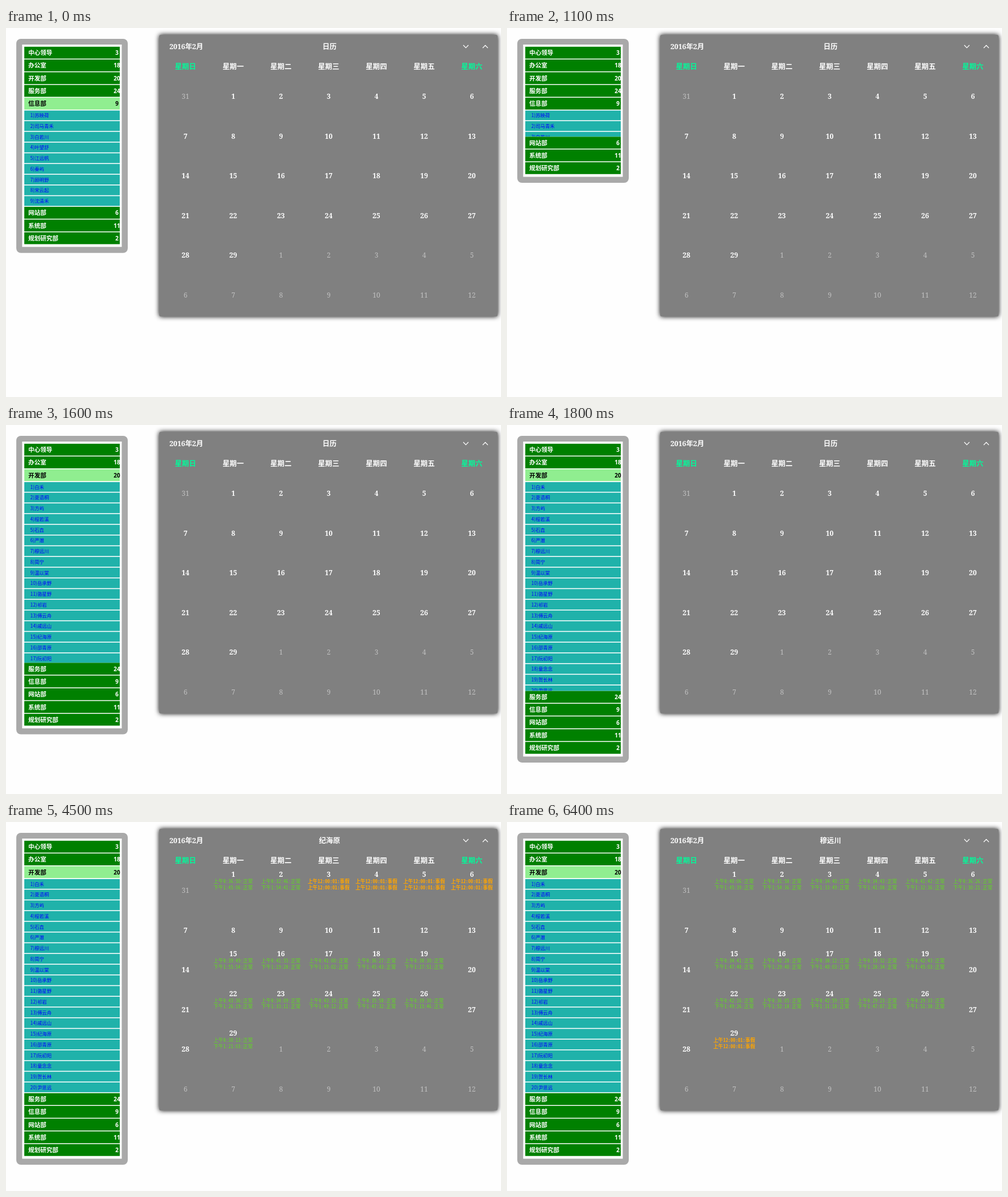
Animation of 866x646 px, one loop 8000 ms. Source, as an HTML page:

```html
<!DOCTYPE html>
<html lang="zh-CN">
<head>
<meta charset="utf-8">
<style>
html, body { margin: 0; width: 100%; height: 100%; overflow: hidden; background: #fefefe; }
body > svg { display: block; }
text { white-space: pre; }
.mid { text-anchor: middle; }
.dept { font: bold 10.5px 'Noto Sans CJK SC', sans-serif; }
.count { font: bold 10px 'Open Sans', 'Noto Sans', sans-serif; }
.item { font: 8.4px 'Noto Sans CJK SC', sans-serif; fill: #00f; }
.cal { font: bold 12.3px 'Noto Serif', 'Noto Sans CJK SC', serif; fill: #fff; }
.day { font: 600 12px 'Noto Serif', serif; fill: #fff; }
.other { font-weight: 400; fill: #bfbfbf; }
.weekend { fill: #00fa9a; }
.log { font: 8.6px 'Noto Sans Mono CJK SC', 'Noto Sans CJK SC', monospace; fill: #5fdc1e; }
.leave { font-weight: bold; fill: #ffa500; }
.board { fill: #808080; filter: drop-shadow(0 0 4px #000); }
</style>
</head>
<body>
<svg id="stage" width="866" height="646"></svg>
<script>
const LOOP = 8000, ROW = 22.3, ITEM = 18.75;
const DEV = 2, INFO = 4;
const depts = ['中心领导 3', '办公室 18', '开发部 20', '服务部 24',
  '信息部 9', '网站部 6', '系统部 11', '规划研究部 2'].map(s => s.split(' '));
const people = {
  [INFO]: '苏映荷 司马青禾 白若川 叶望舒 江远帆 秦屿 顾明野 宋云起 沈清禾'.split(' '),
  [DEV]: ('白禾 夏语桐 方屿 程若溪 石垚 严澈 穆远川 简宁 温以棠 岳承野 骆星野 祁岩 ' +
    '傅云舟 戚远山 纪海原 邵青原 阮初阳 童念念 贺长林 尹思远').split(' ')
};

// Whose attendance is on the calendar: clock seed, days on leave, extra Saturday shift
const sheets = {
  first: { seed: 1, leave: d => d > 2 && d < 7, saturday: true },
  second: { seed: 2, leave: () => false, saturday: false },
  third: { seed: 3, leave: d => d === 29, saturday: true }
};

const random = n => {
  const v = Math.sin(n * 12.9898) * 43758.5453;
  return v - Math.floor(v);
};
const swing = p => .5 - Math.cos(Math.PI * p) / 2;

const text = (s, x, y, cls, size, fill = '') =>
  `<text x="${x}" y="${y + size * .37}" class="${cls}"${fill && ` fill="${fill}"`}>${s}</text>`;
const rect = (x, y, w, h, fill, r = 0) =>
  `<rect x="${x}" y="${y}" width="${w}" height="${h}" rx="${r}" fill="${fill}"/>`;

function state(t) {
  const n = Math.floor(t / 100);
  const dev = n >= 14;
  const open = dev
    ? (n < 20 ? 1 - Math.exp(-.93 * (n - 14)) : 1)
    : (n < 9 ? 1 : 1 - swing(Math.min(1, .3 + (n - 9) * .175)));
  const staff = people[DEV];
  return {
    dept: dev ? DEV : INFO,
    hover: dev ? DEV : n < 9 ? INFO : -1,
    open,
    title: n < 24 ? '日历' : n < 45 ? staff[0] : n < 58 ? staff[14] : staff[6],
    sheet: n < 25 ? null : n < 46 ? sheets.first : n < 64 ? sheets.second : sheets.third
  };
}

function menu({ dept, hover, open }) {
  let y = 32.8, out = '';
  depts.forEach(([name, count], i) => {
    const on = i === hover, ink = on ? '#000' : '#fff';
    out += rect(32, y, 167, 20.8, on ? '#90ee90' : '#008000') +
      text(name, 39, y + 10.4, 'dept', 10.5, ink) +
      text(count, 194, y + 10.6, 'count mid', 10, ink);
    y += ROW;
    if (i !== dept || !open) return;
    const h = people[i].length * ITEM * open;
    out += `<svg x="0" y="${y}" width="213" height="${h}">` + people[i].map((p, k) =>
      rect(32, k * ITEM, 167, 17.2, '#20b2aa') +
      text(`${k + 1})${p}`, 42.5, k * ITEM + 8.8, 'item', 8.4)).join('') + '</svg>';
    y += h;
  });
  return rect(18, 19, 195, y - 5.2, '#a9a9a9', 8) + rect(28.3, 29, 174.2, y - 25.7, '#fff') + out;
}

// Two clock-in lines: within a span of minutes after the given hour
function punches({ seed, leave }, day) {
  if (leave(day)) return Array(2).fill('上午12:00:01:事假');
  const line = (label, hour, from, span) => {
    const s = Math.floor((from + span * random(seed * 100 + day + hour * 7)) * 60);
    const two = v => String(v).padStart(2, '0');
    return `${label}${hour}:${two(Math.floor(s / 60))}:${two(s % 60)}:正常`;
  };
  return [line('上午', 8, 29, 15), line('下午', 1, 15, 42)];
}

function calendar({ title, sheet }) {
  let out = '<rect class="board" x="268" y="12" width="592" height="493" rx="3"/>' +
    text('2016年2月', 286, 32.5, 'cal', 12.3) +
    text(title, 566, 32.5, 'cal mid', 12.3) +
    '<path d="M800 30l4.5 4.7 4.5-4.7M834 35l4.5-4.7 4.5 4.7" fill="none" stroke="#fff" stroke-width="1.2"/>';
  for (let i = 0; i < 42; i++) {
    const col = i % 7, week = (i - col) / 7, x = 314 + col * 83.5, y = 120 + week * 69.5;
    if (!week)
      out += text('星期' + '日一二三四五六'[col], x, 67, 'cal mid' + (col % 6 ? '' : ' weekend'), 12.3);
    const inside = i > 0 && i < 30;
    const day = inside ? i : i ? i - 29 : 31;
    // The second week is a holiday
    const workday = inside && week !== 1 && col % 6 > 0;
    const busy = sheet && (workday || sheet.saturday && i === 6);
    out += text(day, x, busy ? y - 28 : y, inside ? 'day mid' : 'day mid other', 12);
    if (busy) punches(sheet, day).forEach((s, k) =>
      out += text(s, x, y - 15.7 + k * 10.3, 'log mid' + (sheet.leave(day) ? ' leave' : ''), 8.6));
  }
  return out;
}

const stage = document.getElementById('stage');
const start = performance.now();
let shown = '';
function draw() {
  const s = state((performance.now() - start) % LOOP);
  const next = menu(s) + calendar(s);
  if (next !== shown) stage.innerHTML = shown = next;
  requestAnimationFrame(draw);
}
draw();
</script>
</body>
</html>
```
